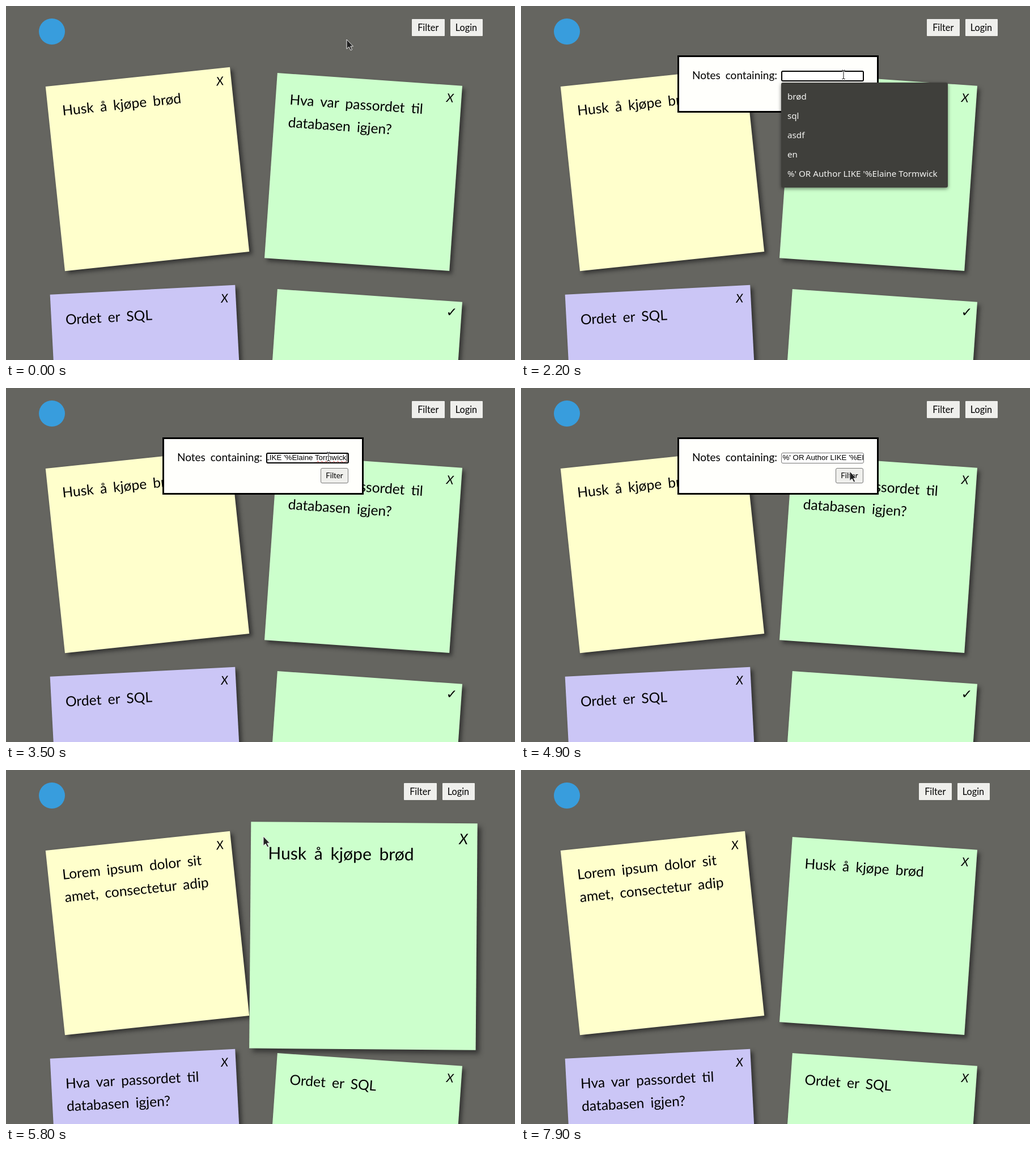
An HTML page that plays this animation: 898 px wide and 624 px high, repeating every 8400 ms.

```html
<!DOCTYPE html>
<html lang="no">
<head>
<meta charset="utf-8">
<title>Notes</title>
<style>
html, body { margin: 0; width: 100%; height: 100%; overflow: hidden; background: #656560; }
body { position: relative; font-family: Lato, sans-serif; color: #000; }
body *, .abs { position: absolute; box-sizing: border-box; white-space: pre; }
.logo { left: 58px; top: 22px; width: 46px; height: 46px; border-radius: 50%; background: #389ddd; }
.button { background: #efefec; text-align: center; border-radius: 1px; }
.nav { top: 22.5px; height: 30.5px; font-size: 16.3px; line-height: 29px; }
.note { width: 327.4px; height: 327.4px; margin: -163.7px; box-shadow: 5px 5px 7px rgba(33,33,33,.7); }
.note.lifted { box-shadow: 10px 10px 7px rgba(0,0,0,.7); z-index: 1; }
.text { left: 25px; top: 25px; font-size: 24.6px; line-height: 40px; word-spacing: 5px; }
.mark { right: 14px; top: 12px; font: italic 21px/20px Lato, sans-serif; }
.mark.check { font: 23px/20px "DejaVu Sans", sans-serif; right: 8px; top: 9px; }
#modal { left: 276px; top: 87px; width: 355px; height: 101px; border: 3px solid #000; background: #fffffc; z-index: 2; }
.label { left: 23px; top: 20px; font-size: 19px; line-height: 24px; word-spacing: 4px; }
#field { left: 179.5px; top: 24px; width: 146px; height: 18.5px; border: 1px solid #767676; border-radius: 3px;
  background: #fff; overflow: hidden; font: 13.33px/16px "Liberation Sans", Arial, sans-serif; }
#field.focus { border: 2px solid #000; line-height: 14px; }
#query { left: 2px; }
.focus #query { left: auto; right: 1px; border-right: 1px solid transparent; }
#query b { position: static; font-weight: normal; }
.focus b { text-decoration: underline wavy #d33 1px; }
#submit { left: 276px; top: 51px; width: 49px; height: 26.5px; border: 1px solid #777; border-radius: 3px;
  font-size: 13.3px; line-height: 24px; }
#list { left: 459px; top: 135px; width: 294px; height: 185px; padding-top: 7px; border-radius: 3px; background: #3f3f3b;
  box-shadow: 0 2px 6px rgba(0,0,0,.5); color: #f4f4f2; z-index: 3; font: 500 15.2px/34px "Noto Sans", sans-serif; }
#list div { position: static; padding-left: 11px; }
#list .picked { background: #565651; }
#cursor { left: 0; top: 0; overflow: visible; z-index: 4; width: 1px; height: 1px; }
</style>
</head>
<body>
<div class="logo"></div>
<div class="button nav" id="filter">Filter</div>
<div class="button nav" id="login">Login</div>
<div id="modal">
  <div class="label">Notes containing:</div>
  <div id="field"><span id="query">%' OR Author LIKE '%Elaine <b>Tormwick</b></span></div>
  <div class="button" id="submit">Filter</div>
</div>
<div id="list"></div>
<svg id="cursor">
  <path id="arrow" d="M0 0V16.5L4 13L7 19L9.6 17.8L6.8 12H11.5Z" fill="#222" stroke="#eee"/>
  <g id="beam" fill="none">
    <path d="M-3-8Q0-8 0-6V6Q0 8-3 8M3-8Q0-8 0-6M0 6Q0 8 3 8" stroke="#fff" stroke-width="2.6"/>
    <path d="M-3-8Q0-8 0-6V6Q0 8-3 8M3-8Q0-8 0-6M0 6Q0 8 3 8" stroke="#111"/>
  </g>
</svg>
<script>
const LOOP = 8400, STEP = 100;
const $ = id => document.getElementById(id);
const show = (el, on) => { el.style.display = on ? '' : 'none'; };

const before = ['Husk å kjøpe brød', 'Hva var passordet til\ndatabasen igjen?', 'Ordet er SQL', ''];
const after = ['Lorem ipsum dolor sit\namet, consectetur adip', before[0], before[1], before[2]];

function add(parent, className, text = '') {
  const el = document.createElement('div');
  el.className = className;
  el.textContent = text;
  return parent.appendChild(el);
}

const notes = [
  { x: 249.5, y: 287.5, angle: -6, color: '#ffc' },
  { x: 631, y: 292.4, angle: 4, color: '#cfc' },
  { x: 250, y: 664, angle: -3, color: '#cbc6f6' },
  { x: 631, y: 673.4, angle: 4, color: '#cfc' },
];
for (const n of notes) {
  n.el = add(document.body, 'note');
  Object.assign(n.el.style, { left: n.x + 'px', top: n.y + 'px', background: n.color });
  n.text = add(n.el, 'text');
  n.mark = add(n.el, 'mark');
}

const suggestions = ['brød', 'sql', 'asdf', 'en', "%' OR Author LIKE '%Elaine Tormwick"]
  .map(text => add($('list'), '', text));

// Tracks are [time, ...values], linear in between.
const pointer = [
  [200, 601, 59], [400, 696, 60], [500, 696, 60], [800, 738, 38], [1400, 738, 38],
  [1500, 735, 53], [1600, 735, 53], [2000, 569, 121], [3600, 569, 121], [4100, 582, 146],
  [4200, 582, 146], [4400, 580, 147], [5400, 580, 147], [5800, 454, 117], [6000, 330, 140],
  [6100, 330, 140], [6500, 200, 205], [6600, 200, 205], [6700, 188, 190], [7100, 275, 88],
  [7300, 275, 88], [7700, 320, 7],
];
const popup = [[2000, 0], [2200, 1], [3100, 1], [3300, .1], [3400, .1], [3500, 0]];
const lifts = [
  [[5850, 0], [6000, .94], [6100, .94], [6200, 1], [7500, 1], [7650, 0]],
  [[5450, 0], [5600, 1], [5783, 1], [5933, 0]],
];

function at(track, t) {
  const i = track.findIndex(key => key[0] > t);
  if (i < 0) return track[track.length - 1].slice(1);
  if (i === 0) return track[0].slice(1);
  const [a, b] = [track[i - 1], track[i]];
  const p = (t - a[0]) / (b[0] - a[0]);
  return a.slice(1).map((v, k) => v + (b[k + 1] - v) * p);
}

function place(el, left, width) {
  el.style.left = left + 'px';
  el.style.width = width + 'px';
}

function draw(t) {
  const within = (from, to) => t >= from && t < to;
  const reloaded = t >= 5000;

  const shift = reloaded ? -14 : 0;
  place($('filter'), 715.5 + shift, 58.5);
  place($('login'), 783.5 + shift, 57);
  $('filter').style.background = within(1000, 1200) ? '#f5f5f5' : within(700, 1500) ? '#e3e3e0' : '';

  notes.forEach((n, i) => {
    const lift = lifts[i] ? at(lifts[i], t)[0] : 0;
    const text = (reloaded ? after : before)[i];
    n.el.style.transform = `rotate(${n.angle * (1 - lift)}deg) scale(${1 + lift / 4})`;
    n.el.classList.toggle('lifted', i === 0 ? within(5900, 7500) : i === 1 && within(5500, 5800));
    n.text.textContent = text;
    n.mark.textContent = text ? 'X' : '✓';
    n.mark.classList.toggle('check', !text);
  });

  show($('modal'), within(1200, 5000));
  $('field').classList.toggle('focus', within(2000, 4900));
  show($('query'), t >= 3100);
  const caret = within(3100, 3800) || within(4300, 4900);
  $('query').style.borderRightColor = caret ? '#000' : 'transparent';
  $('submit').style.background = within(4000, 4900) ? '#e5e5e5' : '';

  const [open] = at(popup, t);
  show($('list'), open > 0);
  $('list').style.opacity = open;
  $('list').style.transform = `scale(${.965 + .035 * open})`;
  suggestions[4].className = t >= 3000 ? 'picked' : '';

  const [x, y] = at(pointer, t);
  const overText = within(2000, 3900) || within(6300, 7000);
  show($('cursor'), t < 7800);
  show($('arrow'), !overText);
  show($('beam'), overText);
  $('cursor').style.transform = `translate(${x}px, ${y}px)`;
}

const start = performance.now();
function frame() {
  const t = (performance.now() - start) % LOOP;
  draw(Math.floor(t / STEP) * STEP);
  requestAnimationFrame(frame);
}
frame();
</script>
</body>
</html>
```
